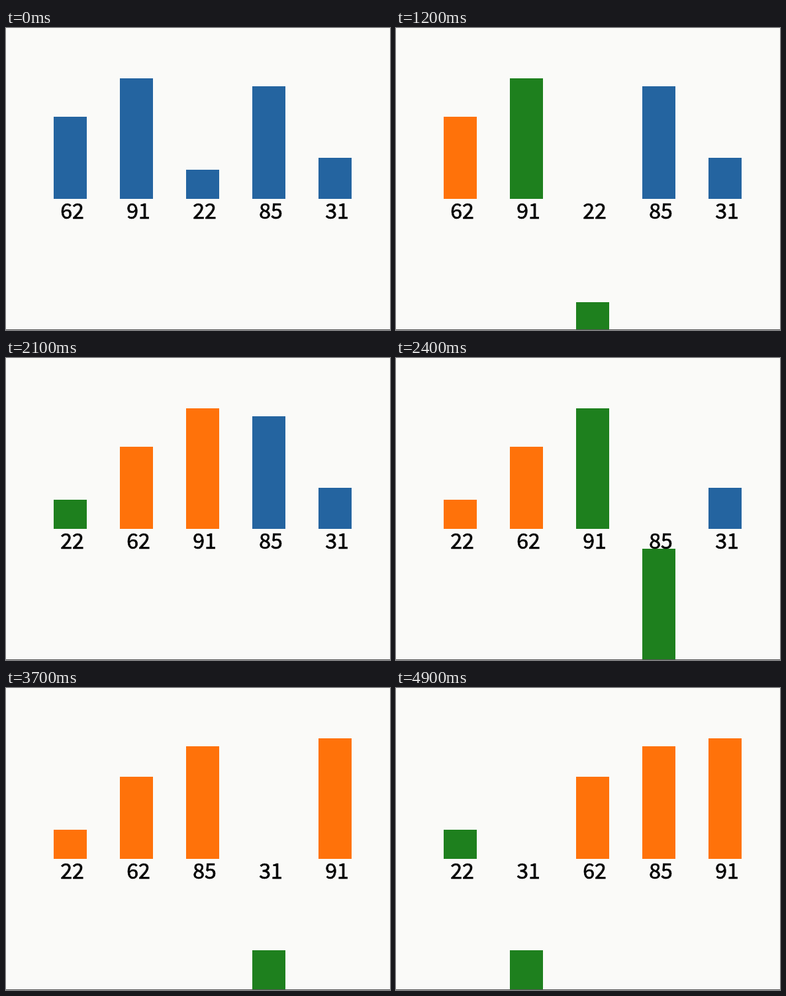
Write an HTML page that moves like this. It is 580 by 456 pixels and loops after 5000 ms.

```html
<!DOCTYPE html>
<html lang="en">
<head>
<meta charset="utf-8">
<title>Insertion sort</title>
<style>
  html, body { margin: 0; width: 100%; height: 100%; overflow: hidden; background: #fafaf8; }
  svg { display: block; width: 580px; height: 456px; }
  text {
    font: 500 32px "Noto Sans CJK SC", "Noto Sans CJK JP", "Noto Sans CJK", sans-serif;
    text-anchor: middle;
    stroke: #000;
    stroke-width: 0.7px;
  }
</style>
</head>
<body>
<svg id="stage" viewBox="0 0 580 456" shape-rendering="crispEdges"></svg>
<script>
const LOOP = 5000;
const VALUES = [62, 91, 22, 85, 31];
const BLUE = '#2464a0', GREEN = '#1e801e', ORANGE = '#ff720a';
const BASE = 258, DROP = 200;

// Moment (ms) at which each step of the sort appears
const TIMES = [0, 200, 300, 500, 700, 900, 1100, 1300, 1600, 1800, 2000, 2200,
  2400, 2600, 2800, 3000, 3200, 3500, 3700, 3900, 4100, 4300, 4500, 4800];

// Run the sort once and keep a copy of the bars after every step
function sortSteps(values) {
  const bars = values.map(value => ({ value, color: BLUE, down: false }));
  const steps = [];
  const save = () => steps.push(bars.map(bar => ({ ...bar })));
  save();
  bars[0].color = ORANGE;
  save();
  for (let i = 1; i < bars.length; i++) {
    const key = bars[i];
    for (let k = 0; k < i; k++) bars[k].color = ORANGE;
    key.color = GREEN;
    key.down = true;
    save();
    for (let j = i - 1; j >= 0; j--) {
      const other = bars[j];
      other.color = GREEN;
      save();
      if (other.value <= key.value) break;
      other.color = ORANGE;
      bars[j] = key;
      bars[j + 1] = other;
      save();
    }
    key.down = false;
    save();
  }
  return steps;
}

const stage = document.getElementById('stage');
function add(tag, attrs) {
  const el = document.createElementNS('http://www.w3.org/2000/svg', tag);
  for (const name in attrs) el.setAttribute(name, attrs[name]);
  return stage.appendChild(el);
}

const rects = VALUES.map((_, i) => add('rect', { x: 72 + i * 100, width: 50 }));
const labels = VALUES.map((_, i) => add('text', { x: 100 + i * 100, y: 288 }));
add('rect', { y: 455, width: 580, height: 1, fill: '#555' });

const steps = sortSteps(VALUES);
let shown = -1;

function draw() {
  const t = performance.now() % LOOP;
  const now = TIMES.filter(time => time <= t).length - 1;
  if (now !== shown) {
    shown = now;
    steps[now].forEach(({ value, color, down }, i) => {
      const height = value * 2;
      rects[i].setAttribute('y', BASE - height + (down ? DROP : 0));
      rects[i].setAttribute('height', height);
      rects[i].setAttribute('fill', color);
      labels[i].textContent = value;
    });
  }
  requestAnimationFrame(draw);
}
draw();
</script>
</body>
</html>
```
